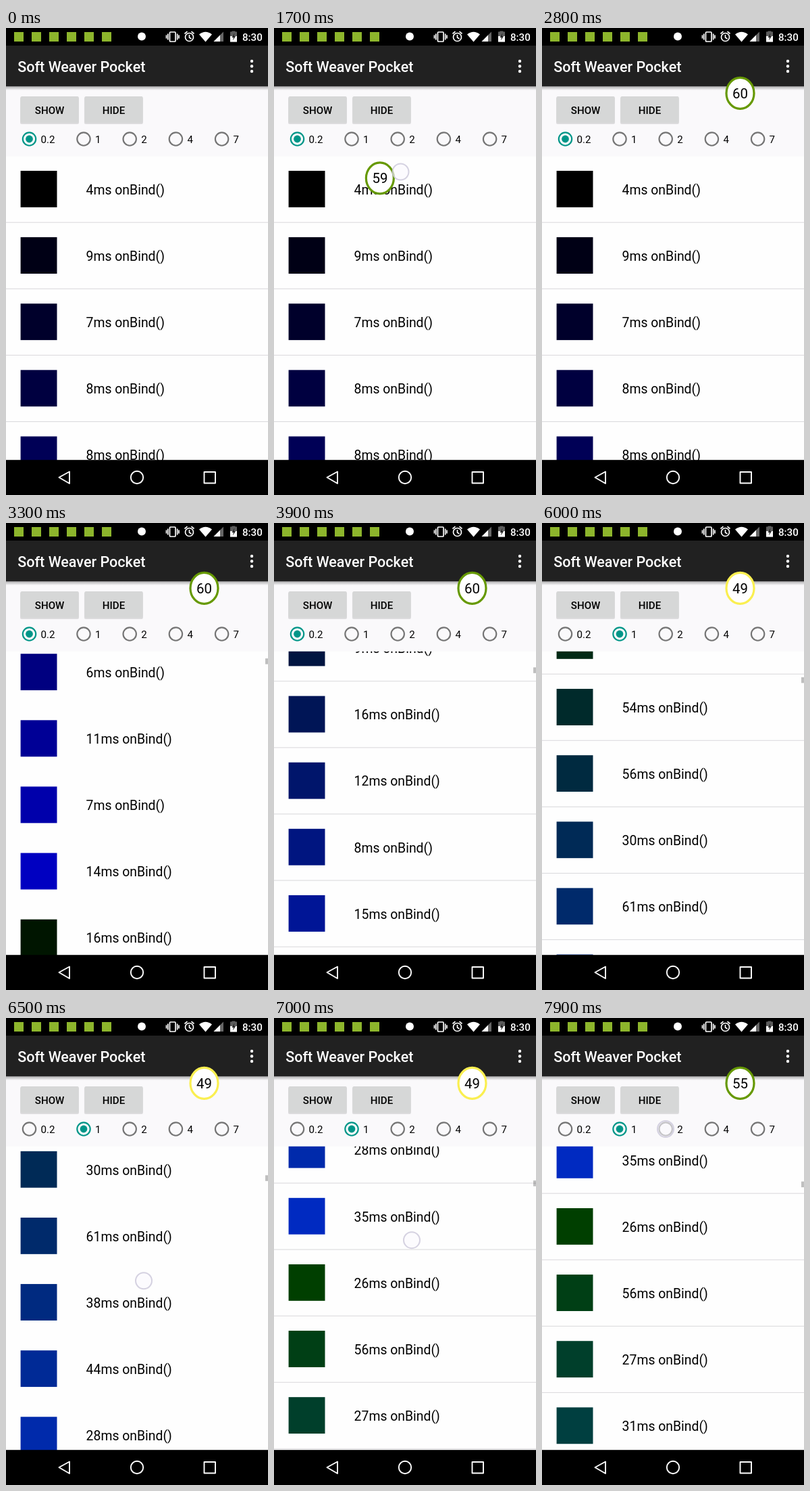
An HTML page for the animation above (8 s loop, 388 by 690 pixels).

```html
<!DOCTYPE html>
<html lang="en">
<head>
<meta charset="utf-8">
<title>List demo</title>
<style>
html, body { margin: 0; width: 388px; height: 690px; overflow: hidden; background: #fff; }
svg { display: block; font-family: Roboto, "Noto Sans", sans-serif; }
.btn { font-size: 15.1px; font-weight: 500; text-anchor: middle; }
.row { font-size: 19.4px; }
.opt { font-size: 15.1px; }
</style>
</head>
<body>
<svg width="388" height="690" viewBox="0 0 388 690">
  <defs>
    <linearGradient id="shade" x2="0" y2="1">
      <stop offset="0" stop-color="#000" stop-opacity=".32"/>
      <stop offset="1" stop-color="#000" stop-opacity="0"/>
    </linearGradient>
  </defs>
  <rect width="388" height="690" fill="#fefefe"/>
  <g id="rows"></g>
  <rect id="bar" x="384" width="4" height="8.5" fill="#000" opacity=".25"/>

  <rect y="86" width="388" height="103.7" fill="#faf9fb"/>
  <rect y="86" width="388" height="6" fill="url(#shade)"/>
  <g id="buttons"></g>
  <g id="options"></g>

  <rect y="26" width="388" height="60.2" fill="#212121"/>
  <text x="17.2" y="64.5" font-size="21.55" font-weight="500" fill="#fff">Soft Weaver Pocket</text>
  <g fill="#fff"><circle cx="364" cy="49" r="2.2"/><circle cx="364" cy="56.5" r="2.2"/><circle cx="364" cy="64" r="2.2"/></g>

  <rect width="388" height="26" fill="#000"/>
  <g id="notices" fill="#8db52c"></g>
  <circle cx="201" cy="12.5" r="6" fill="#fff"/>
  <g fill="none" stroke="#fff" stroke-width="1.7">
    <rect x="242.5" y="6" width="8.5" height="14" rx="1"/>
    <path d="M239.8 8.5v9M237.5 10.5v5M253.7 8.5v9M256 10.5v5"/>
    <circle cx="271.5" cy="13.5" r="6"/>
    <path d="M271.5 10v4l3 2M264.5 8.5l4-3.3M278.5 8.5l-4-3.3"/>
  </g>
  <path d="M286 9.5Q295.5 2 305 9.5L295.5 20.5Z" fill="#fff"/>
  <path d="M322 5.5V20H307.5Z" fill="#666"/>
  <path d="M317 10.5V20H307.5Z" fill="#fff"/>
  <path d="M334.5 5.5V4.5H339.5V5.5H342V20.5H332V5.5Z" fill="#5c5c5c"/>
  <path d="M332 12H342V20.5H332Z" fill="#fff"/>
  <path d="M338.5 7.5L334.5 14H337L336 18.5L340 12H337.5Z" fill="#222"/>
  <text x="350" y="18.5" font-size="15.1" font-weight="500" fill="#fff">8:30</text>

  <rect y="638.2" width="388" height="52" fill="#000"/>
  <g fill="none" stroke="#fff" stroke-width="1.9" stroke-linejoin="round">
    <path d="M78.5 664L94 655.5V673Z"/>
    <circle cx="194" cy="664" r="9.2"/>
    <rect x="293.5" y="656" width="16.5" height="16.5"/>
  </g>

  <g id="chip">
    <ellipse id="ring" rx="20.5" ry="23" fill="#fff" stroke-width="3.2"/>
    <text id="fps" y="7.2" font-size="20.4" text-anchor="middle"></text>
  </g>
  <circle id="touch" r="12" fill="#faf9fd" fill-opacity=".6" stroke="#cbc7da" stroke-opacity=".8" stroke-width="2"/>
</svg>
<script>
const LOOP = 8000, STEP = 100;
const PITCH = 98.11, FIRST = 211, ROWS = 35;
const SETTING_AT = 4500;
const $ = id => document.getElementById(id);
const clamp = v => Math.min(1, Math.max(0, v));
const within = (t, from, to) => t >= from && t < to;
const place = (el, x, y) => el.setAttribute('transform', `translate(${x} ${y})`);
const show = (el, on) => el.setAttribute('visibility', on ? 'visible' : 'hidden');

function add(parent, tag, attrs, text) {
  const el = document.createElementNS('http://www.w3.org/2000/svg', tag);
  for (const k in attrs) el.setAttribute(k, attrs[k]);
  if (text !== undefined) el.textContent = text;
  return parent.appendChild(el);
}

// Binding costs shown in the rows under each load setting
const light = [4, 9, 7, 8, 8, 5, 6, 11, 7, 14, 16];
const heavy = [37, 35, 27, 31, 29, 52, 33, 54, 56, 30, 61, 38, 44, 28, 35, 26, 56, 27, 31];
const HEAVY_FIRST = 15;
const lightCost = i => light[i] ?? 6 + i * 7 % 11;
const heavyCost = i => heavy[i - HEAVY_FIRST] ?? 26 + i * 13 % 30;

const flings = [
  { start: 3000, time: 1263, dist: 1448.6 },
  { start: 5200, time: 1300, dist: 793.1 },
  { start: 6400, time: 941, dist: 631.6 }
];
const easeOut = p => 1 - (1 - p) ** 2;
const scrollAt = t => flings.reduce((s, f) => s + f.dist * easeOut(clamp((t - f.start) / f.time)), 0);

// A tap stays put; a drag moves with the list
const taps = [
  { from: 500, to: 800, x: 64, y: 122 },
  { from: 4300, to: 4500, x: 115, y: 164 },
  { from: 7800, to: 8000, x: 183, y: 164 }
];
const drags = [
  { from: 2900, to: 3200, x: 205, y: 520 },
  { from: 5200, to: 5500, x: 203, y: 488 },
  { from: 6400, to: 6600, x: 204, y: 520 },
  { from: 6800, to: 7200, x: 204, y: 454 }
];

// The chip follows the finger along a curve, a little late
const move = { from: 1200, time: 1250, lag: 160 };
function chipAt(t) {
  const p = clamp((t - move.from) / move.time), q = 1 - p;
  const curve = (a, b, c) => q * q * a + 2 * p * q * b + p * p * c;
  return [curve(76, 172, 293.5), curve(210, 272.5, 96.4)];
}

function touchAt(t) {
  const held = p => within(t, p.from, p.to);
  const tap = taps.find(held), drag = drags.find(held);
  if (tap) return [tap.x, tap.y];
  if (drag) return [drag.x, drag.y - scrollAt(t) + scrollAt(drag.from)];
  if (within(t, move.from, move.from + move.time)) {
    const [x, y] = chipAt(t + move.lag);
    return [x + 3, y + 3];
  }
}

const readings = [[0, 60], [1500, 59], [2300, 60], [4700, 45], [5600, 49], [7400, 55]];
const fpsColor = v => v >= 55 ? '#669900' : v >= 48 ? '#faef50' : '#cc0000';

const rows = Array.from({ length: ROWS }, (_, i) => {
  const top = FIRST + PITCH * i;
  const green = Math.floor(i / 10) * 21, blue = Math.round(i % 10 * 21.4);
  add($('rows'), 'rect', { x: 21.6, y: top, width: 53.9, height: 53.9, fill: `rgb(0,${green},${blue})` });
  return {
    label: add($('rows'), 'text', { x: 118.6, y: top + 34.7, class: 'row' }),
    line: add($('rows'), 'rect', { y: top + 75.7, width: 388, height: 1.1, fill: '#dcdbde' })
  };
});

const buttons = ['SHOW', 'HIDE'].map((label, i) => {
  const x = 21.5 + 94.9 * i;
  add($('buttons'), 'rect', { x: x - .5, y: 102, width: 87, height: 40, rx: 2, fill: '#000', opacity: .12 });
  const face = add($('buttons'), 'rect', { x, y: 101, width: 86.2, height: 39, rx: 2 });
  add($('buttons'), 'text', { x: x + 43.1, y: 127, class: 'btn' }, label);
  return face;
});

const options = ['0.2', '1', '2', '4', '7'].map((label, i) => {
  const cx = i ? 46.8 + 68.2 * i : 34.5;
  const ring = add($('options'), 'circle', { cx, cy: 164, r: 9.7, fill: 'none', 'stroke-width': 2.15 });
  const dot = add($('options'), 'circle', { cx, cy: 164, r: 5.4, fill: '#009688' });
  add($('options'), 'text', { x: cx + 17, y: 169.5, class: 'opt' }, label);
  return { ring, dot };
});

for (let i = 0; i < 6; i++) add($('notices'), 'rect', { x: 12 + 26 * i, y: 6, width: 14, height: 14 });

function draw(t) {
  const scroll = scrollAt(t), changed = t >= SETTING_AT;
  const fast = scroll - scrollAt(t - STEP) > 100;
  place($('rows'), 0, -scroll);
  rows.forEach(({ label, line }, i) => {
    label.textContent = `${changed ? heavyCost(i) : lightCost(i)}ms onBind()`;
    show(line, !fast);
  });
  $('bar').setAttribute('y', 189 + scroll * .0183);
  show($('bar'), flings.some(f => t > f.start && t < f.start + f.time + 600));

  buttons.forEach((b, i) => b.setAttribute('fill', i === 0 && within(t, 600, 800) ? '#c2c3c3' : '#d6d7d7'));
  options.forEach(({ ring, dot }, i) => {
    const on = i === Number(changed);
    ring.setAttribute('stroke', on ? '#009688' : '#757575');
    show(dot, on);
  });

  const fps = readings.filter(r => r[0] <= t).pop()[1];
  $('fps').textContent = fps;
  $('ring').setAttribute('stroke', fpsColor(fps));
  $('chip').setAttribute('opacity', clamp((t - 700) / 300));
  place($('chip'), ...chipAt(t));

  const touch = touchAt(t);
  show($('touch'), touch);
  if (touch) place($('touch'), ...touch);
}

const start = performance.now();
function tick() {
  const t = (performance.now() - start) % LOOP;
  draw(Math.floor(t / STEP) * STEP);
  requestAnimationFrame(tick);
}
tick();
</script>
</body>
</html>
```
